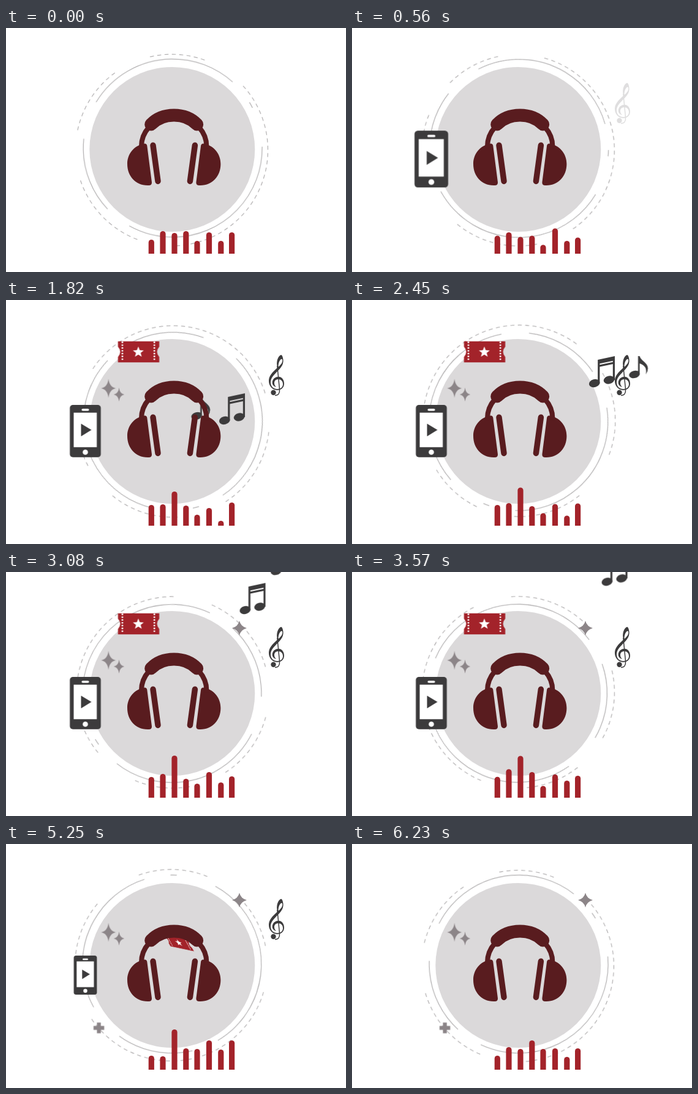
Animation of 555 by 400 pixels, one loop 6300 ms. Source, as an HTML page:

```html
<!DOCTYPE html>
<html lang="en">
<head>
<meta charset="utf-8">
<title>Music loop</title>
<style>
html, body { margin: 0; width: 100%; height: 100%; overflow: hidden; background: #fff; }
svg { display: block; width: 555px; height: 400px; }
.line { fill: none; stroke: #b0aeaf; stroke-width: 1.2; }
.dark { fill: #3c3b3c; }
.red { fill: #a3232a; }
.white { fill: #fff; }
.gray { fill: #8c8588; }
.phones { fill: #591c1f; }
.thick { fill: none; stroke: #591c1f; stroke-linecap: round; }
.anim { animation: 6300ms linear infinite; }

#solid { transform-origin: 271.5px 198px; animation-name: cw; }
#dashed { transform-origin: 271.3px 198.7px; animation-name: ccw; }
#phone { animation-name: phone; }
#clef { animation-name: clef; }
#ticket { animation-name: ticket; }
#pair { animation-name: pair; }
#single { animation-name: single; }
#spark1 { animation-name: spark1; }
#spark2 { animation-name: spark2; }
#spark3 { animation-name: spark3; }
#plus { animation-name: plus; }

@keyframes cw { to { transform: rotate(360deg); } }
@keyframes ccw { to { transform: rotate(-362deg); } }
@keyframes phone {
  0%, 4% { transform: scale(0); animation-timing-function: ease-out; }
  8.5% { transform: scale(1.09); animation-timing-function: ease-in-out; }
  11.1%, 81.1% { transform: scale(1); }
  83.33% { transform: scale(.75); }
  87%, 100% { transform: scale(0); }
}
@keyframes clef {
  0%, 8% { opacity: 0; }
  13.5%, 90% { opacity: 1; }
  94.5%, 100% { opacity: 0; }
}
@keyframes ticket {
  0%, 13% { transform: translate(-20px, -50px) skewY(12deg) skewX(0deg) scale(.82, .9); }
  17.78% { transform: translate(81px, 15px) skewY(9deg) skewX(0deg) scale(.86, .92); animation-timing-function: ease-out; }
  24.4%, 78.9% { transform: translate(216.5px, 85px) skewY(0deg) skewX(0deg) scale(1, 1); animation-timing-function: ease-in; }
  83.33% { transform: translate(281.5px, 161.5px) skewY(12deg) skewX(32deg) scale(.57, .51); }
  86.2% { transform: translate(385px, 205px) skewY(8deg) skewX(12deg) scale(.75, .72); }
  88.9% { transform: translate(500px, 200px) skewY(-10deg) skewX(0deg) scale(.86, .9); }
  91.5%, 100% { transform: translate(625px, 150px) skewY(-14deg) skewX(0deg) scale(.86, .9); }
}
@keyframes pair {
  0%, 22.2% { transform: translate(333px, 222px) scale(0); }
  28.89% { transform: translate(369px, 179px) scale(1); }
  38.9% { transform: translate(408px, 118px) scale(1); }
  48.89% { transform: translate(402.5px, 44px) scale(1); }
  57.1% { transform: translate(430px, -5px) scale(1); }
  61%, 100% { transform: translate(434px, -50px) scale(1); }
}
@keyframes single {
  0%, 24.4% { transform: translate(333px, 222px) scale(0); }
  28.89% { transform: translate(317.5px, 178px) scale(1); }
  34.9% { transform: translate(415px, 160px) scale(1); }
  39.7% { transform: translate(478px, 100px) scale(1); }
  44.4% { transform: translate(493px, 38px) scale(1); }
  48.89% { transform: translate(447.5px, -13px) scale(1); }
  52%, 100% { transform: translate(415px, -60px) scale(1); }
}
@keyframes spark1 { 0%, 23.3% { transform: scale(0); } 27%, 100% { transform: scale(1); } }
@keyframes spark2 { 0%, 24.5% { transform: scale(0); } 28.2%, 100% { transform: scale(1); } }
@keyframes spark3 { 0%, 40% { transform: scale(0); } 44%, 100% { transform: scale(1); } }
@keyframes plus { 0%, 56.7% { transform: scale(0); } 60.7%, 100% { transform: scale(1); } }
</style>
</head>
<body>
<svg viewBox="0 0 555 400">
  <defs>
    <clipPath id="floor"><rect width="555" height="370"/></clipPath>
    <path id="star4" d="M0-12Q2.4-2.4 12 0Q2.4 2.4 0 12Q-2.4 2.4-12 0Q-2.4-2.4 0-12Z"/>
    <path id="tall4" d="M0-15.500Q1.600-2 12 0Q1.600 2 0 15.500Q-1.600 2-12 0Q-1.600-2 0-15.500Z"/>
    <g id="half">
      <path d="M223.500 190Q229.500 188 230.300 193L238 253Q238.300 258 233 258C212 259 198 243 198 223C198 206 209 193.500 223.500 190Z"/>
      <path class="thick" stroke-width="9.500" d="M240 192.300L248 251.200"/>
      <path class="thick" stroke-width="8" d="M221 194C221 182 226 171 233 163"/>
    </g>
    <path id="holes" stroke="#fff" stroke-width="2.800" stroke-linecap="round" stroke-dasharray="0 4.600" d="M0-15.500V16.500"/>
  </defs>

  <circle cx="271.300" cy="199" r="135" fill="#dbd9da"/>
  <g id="solid" class="anim line">
    <circle cx="272.150" cy="196.900" r="146" pathLength="360" transform="rotate(-1 272.150 196.900)"
      stroke-dasharray="120 17.700 49.300 25 101 17 4 26"/>
  </g>
  <g id="dashed" class="anim line" stroke-dasharray="6.500 5.500"></g>

  <g id="bars" class="red" clip-path="url(#floor)"></g>

  <g class="gray">
    <g transform="translate(167.300 144.700)"><g id="spark1" class="anim"><use href="#tall4"/></g></g>
    <g transform="translate(184.500 155)"><g id="spark2" class="anim"><use href="#tall4" transform="scale(.72)"/></g></g>
    <g transform="translate(381 92)"><g id="spark3" class="anim"><use href="#star4"/></g></g>
    <g transform="translate(151.600 301.500)"><path id="plus" class="anim" d="M-3.200-8.700H3.200V-3.200H8.700V3.200H3.200V8.700H-3.200V3.200H-8.700V-3.200H-3.200Z"/></g>
  </g>

  <g id="pair" class="anim dark">
    <ellipse cx="-12.300" cy="18.500" rx="9" ry="6.500" transform="rotate(-15 -12.300 18.500)"/>
    <ellipse cx="11.600" cy="13" rx="9" ry="6.500" transform="rotate(-15 11.600 13)"/>
    <path d="M-6.800-20L21-26V13H17.800V-13L-3.600-8.500V18.500H-6.800ZM-3.600-11.800L17.800-16.300V-18.300L-3.600-13.800Z" fill-rule="evenodd"/>
  </g>
  <g id="single" class="anim dark">
    <ellipse cx="-6.500" cy="12" rx="9" ry="6" transform="rotate(-15 -6.500 12)"/>
    <path d="M-.6-18H2C4-10 15-8 15.500 2Q15.500 7 12 12Q15-2 2-6V12H-.6Z"/>
  </g>

  <g id="ticket" class="anim">
    <path class="red" d="M-33.700-17.300H33.700V-8.500Q26.500 0 33.700 8.500V17.300H-33.700V8.500Q-26.500 0-33.700-8.500Z"/>
    <use href="#holes" x="-26.500"/><use href="#holes" x="25.700"/>
    <path id="star5" class="white"/>
  </g>

  <g class="phones">
    <use href="#half"/>
    <use href="#half" transform="matrix(-1 0 0 1 548.400 0)"/>
    <path class="thick" stroke-width="21" d="M236.700 158C256 138 292.400 138 311.700 158"/>
  </g>

  <g transform="translate(129.500 215)">
    <g id="phone" class="anim dark">
      <rect x="-25.300" y="-43" width="50.600" height="85.700" rx="5"/>
      <rect class="white" x="-19" y="-30.300" width="37.700" height="56.600"/>
      <rect class="white" x="-6" y="-36.700" width="12" height="3.400" rx="1.700"/>
      <circle class="white" cy="34.500" r="4.300"/>
      <path d="M-7-12.300L10-2L-7 8.500Z"/>
    </g>
  </g>

  <g id="clef" class="anim dark">
    <path fill-rule="evenodd" d="M443 111C434 119 429 125 429 132.500C429 142 436 147.700 443 147.700C450 147.700 454 143 454 137C454 130 449.500 125.700 445 125.700C439 125.700 434.700 130 434.700 135.500C434.700 139.500 437.500 142 441 142.500C438.800 140.500 438 138.500 438 136C438 132 441 130 444.500 130C449 130 452 133 452 138C452 143 448 146 443 146C437 146 432 142 432 135C432 128 437 123 444 116C451 109 453 104 452.500 98C452 93 450.500 90 449 90C445 91 441 99 442.500 108ZM451 97.500C449 94 444 102 444.600 109.500C449 106 452 102 451 97.500Z"/>
    <path d="M442.800 108L446.600 147Q447 156.500 439 156.500" fill="none" stroke="#3c3b3c" stroke-width="1.500"/>
    <circle cx="436.500" cy="151.800" r="4.200"/>
  </g>
</svg>
<script>
const LOOP = 6300, NS = 'http://www.w3.org/2000/svg';
const $ = id => document.getElementById(id);

function add(parent, tag, attrs) {
  const el = document.createElementNS(NS, tag);
  for (const key in attrs) el.setAttribute(key, attrs[key]);
  return parent.appendChild(el);
}

function polar(cx, cy, r, deg) {
  const a = deg * Math.PI / 180;
  return (cx + r * Math.cos(a)).toFixed(2) + ' ' + (cy + r * Math.sin(a)).toFixed(2);
}

// Broken outer ring: start and end angles
for (const [from, to] of [[257, 290.5], [-42, 88], [111, 163], [192, 234]]) {
  const p = deg => polar(270.5, 200.1, 157, deg);
  add($('dashed'), 'path', { d: `M${p(from)}A157 157 0 0 1 ${p(to)}` });
}

const points = Array.from({ length: 10 }, (_, i) => polar(-.5, .5, i % 2 ? 4 : 9.3, i * 36 - 90));
$('star5').setAttribute('d', 'M' + points.join('L') + 'Z');

// Equalizer: bar tops at key times
const times = [0, 1120, 1820, 3080, 4200, 5250, 6230];
const tops = [
  [347, 333, 336, 333, 349, 335, 349, 335],
  [334, 337, 349, 348, 362, 322, 349, 352],
  [336, 335, 314, 337, 352, 341, 362, 332],
  [336, 331, 301, 339, 347, 328, 345, 335],
  [341, 322, 308, 322, 362, 348, 343, 343],
  [347, 348, 304, 335, 336, 322, 337, 322],
  [347, 333, 336, 322, 336, 335, 349, 335]
];
const bars = [237.3, 256, 275, 293.8, 312, 331.5, 350.8, 368.6].map(x =>
  add($('bars'), 'rect', { x: x - 4.6, width: 9.2, height: 120, rx: 4.6 }));

function drawBars(t) {
  let k = 0;
  while (k < times.length - 2 && t >= times[k + 1]) k++;
  const u = Math.min(1, (t - times[k]) / (times[k + 1] - times[k]));
  const mix = (1 - Math.cos(Math.PI * u)) / 2;
  bars.forEach((bar, i) => {
    const a = tops[k][i], b = tops[k + 1][i];
    const bounce = (i % 2 ? 6 : -6) * Math.sin(2 * Math.PI * u * (1 + i % 2));
    bar.setAttribute('y', Math.min(362, a + (b - a) * mix + bounce));
  });
}

let start;
function tick(now) {
  start ??= now;
  drawBars((now - start) % LOOP);
  requestAnimationFrame(tick);
}
drawBars(0);
requestAnimationFrame(tick);
</script>
</body>
</html>
```
